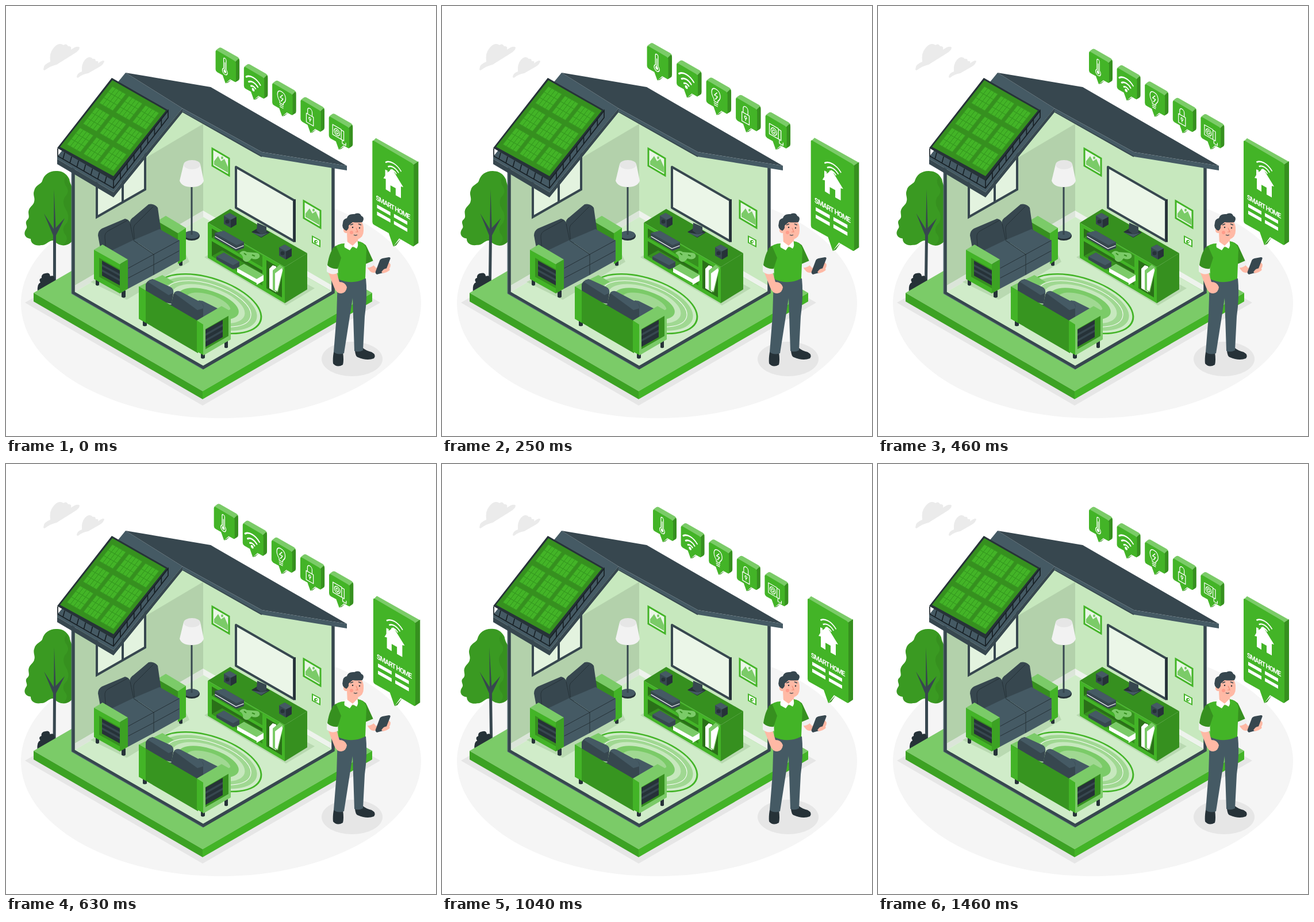
Write an HTML page that moves like this. It is 748 px wide and 748 px high and loops after 1.5 s.

```html
<!DOCTYPE html>
<html lang="en">
<head>
<meta charset="utf-8">
<title>Smart home</title>
<style>
html, body { margin: 0; height: 100%; overflow: hidden; background: #fff }
svg { display: block; width: 100vw; height: 100vh }
.g { fill: #43b427 } .d { fill: #36901f } .l { fill: #7bcb68 } .n { fill: #2a7018 }
.s { fill: #455a64 } .k { fill: #37474f } .b { fill: #263238 } .w { fill: #fff }
.skin { fill: #ffb9a5 } .glass { fill: #ebf6e8 } .soft { fill: #a0d892 }
.line { fill: none; stroke: #fff; stroke-linecap: round; stroke-linejoin: round }
.dark { fill: none; stroke: #37474f }
.seam { fill: none; stroke: #263238; stroke-linecap: round }
</style>
</head>
<body>
<svg viewBox="0 0 748 748">
<ellipse cx="374" cy="517" rx="348" ry="200" fill="#f5f5f5"/>
<g fill="#ebebeb">
  <path d="M65 111Q65 101 77 97Q75 82 82 74Q91 62 100 68Q105 64 108 70Q115 69 113 76Q124 68 128 72Q128 77 120 82L88 102Q78 104 67 112Z"/>
  <path d="M123 124Q123 117 132 114Q131 101 137 94Q145 85 151 92Q156 91 156 96Q162 95 160 100Q169 93 171 96Q170 101 164 105L143 117Q134 118 125 125Z"/>
</g>

<g id="tree">
  <path fill="#3a9a22" d="M89 287C76 286 66 293 63 304C62 310 51 311 49 321C46 329 51 333 49 340C48 347 40 349 39 358C39 365 42 368 36 373C32 379 39 383 35 388C29 397 34 404 43 405C43 414 52 418 61 416C70 417 74 407 83 408C91 417 104 420 113 411L126 400V325C116 318 112 312 110 301C105 291 97 287 89 287Z"/>
  <path class="d" d="M105 296C108 310 116 318 126 325V400L113 411Q107 416 99 416Q111 406 102 396Q96 386 106 377Q112 365 103 352Q96 338 105 329Q111 321 103 311Q99 302 105 296Z"/>
  <path class="k" d="M83.500 319L86.500 386L102 369L87 399V506H82V399L66 361L83 388Z"/>
  <path class="b" d="M55 497Q54 483 60 481Q56 475 62 473Q61 466 69 465Q76 463 77 470Q85 467 85 476Q90 478 86 485V498Z"/>
</g>

<path fill="#e6e6e6" d="M33 516L342 338L651 516L342 695Z"/>
<path class="l" d="M48 499L342 329L637 499L342 670Z"/>
<path fill="#3ca223" d="M48 499L342 670V684L48 514Z"/>
<path class="g" d="M637 499V514L342 684V670Z"/>

<!-- room -->
<path fill="#b3d1ab" d="M118 290L307 180L343 204V366L118 497Z"/>
<path fill="#c7e8be" d="M307 181L343 205L240 266Z"/>
<path fill="#c7e8be" d="M343 204L307 180L445 258L568 281V497L343 366Z"/>
<path fill="#d0ecc9" d="M118 497L343 366L568 497L343 628Z"/>
<path fill="#eef3ed" d="M120 486L343 356L567 486V496L343 367L120 497Z"/>
<path fill="#dbe5d9" d="M120 486L343 356V367L120 497Z"/>
<path class="dark" stroke-width="5.500" d="M117 280V499L343 629L569 498V278"/>
<path fill="none" stroke="#5a707b" d="M114 285V500L343 632"/>

<!-- window -->
<path fill="#e3f3df" d="M158 312L242 262V319L158 368Z"/>
<path class="dark" stroke-width="4" d="M158 300V367L242 319V255M203 280V342"/>

<!-- roof -->
<path class="s" d="M208 116L307 178L187 324L89 266V262Z"/>
<path class="k" d="M208 116L356 141L593 278L445 254L307 178Z"/>
<path class="s" d="M445 254L593 278V286L445 262L307 183V178Z"/>
<path class="k" d="M307 178V185L187 333L89 275V266L187 324Z"/>
<path class="dark" stroke-width="2" d="M307 184L445 262"/>
<path class="b" d="M184 125L282 181L187 304L89 247Z"/>
<path class="d" d="M185 129L278 182L187 296L94 245Z"/>
<g id="solar" class="g" stroke="#369a20" stroke-width="1"></g>
<path id="rail" fill="none" stroke="#182126" stroke-width="1.700" d="M90 248V261L187 317L282 194V182L187 304V317"/>

<!-- wall pictures and lamp -->
<g id="frame">
  <path class="glass" stroke="#43b427" stroke-width="3" d="M359 248L388 265V295L359 278Z"/>
  <path class="l" d="M362 276V270L369 261L374 270L380 266L386 280V290Z"/>
  <ellipse class="l" cx="376" cy="264" rx="2" ry="2.500"/>
</g>
<use href="#frame" x="159" y="91"/>
<path class="g" d="M532 399L547 407V420L532 412Z"/>
<path class="w" d="M534 402L545 408V417L534 411Z"/>
<circle class="g" cx="539" cy="410" r="3"/><circle class="w" cx="540" cy="410" r="1.300"/>
<ellipse class="b" cx="323" cy="400" rx="14" ry="8"/><ellipse class="s" cx="323" cy="398" rx="13" ry="7"/>
<path class="dark" stroke-width="3" d="M323 310V398"/>
<path fill="#f2f2f2" d="M309 275L302 304Q306 315 323 315Q340 315 344 304L338 275Z"/>
<ellipse cx="323.500" cy="276" rx="14.500" ry="8" fill="#e6e6e6"/>

<!-- cabinet -->
<path fill="#b9d9b1" d="M345 437L355 431L524 484L537 491L487 521Z"/>
<path class="glass" stroke="#37474f" stroke-width="4" stroke-linejoin="round" d="M400 280L501 338V409L400 351Z"/>
<path class="b" d="M500 337L504 336V411L500 409Z"/>
<path class="d" d="M351 377L390 353L524 430L485 454Z"/>
<path class="g" d="M351 377L485 454V517L351 438Z"/>
<path class="d" d="M485 454L524 430V493L485 517Z"/>
<path class="n" d="M358 387L446 438V454L358 403ZM358 409L446 460V486L358 435ZM453 442L480 458V507L453 491Z"/>
<path class="d" d="M358 403L376 393L446 434V454ZM358 435L376 425L446 465V486Z"/>
<path class="k" d="M363 395L379 391L414 411V421L401 426L363 404Z"/>
<path class="s" d="M363 395L379 391L414 411L401 416Z"/>
<path class="line" stroke-width="1.300" d="M364 401L400 422L413 417"/>
<path class="k" d="M366 436L379 429L406 445V454L395 458L366 441Z"/>
<path class="s" d="M366 436L379 429L406 445L395 451Z"/>
<path class="l" d="M406 430Q412 423 419 428L432 429Q443 429 441 437Q436 443 427 439Q419 450 412 441Q414 435 406 430Z"/>
<path fill="none" stroke="#36901f" stroke-width="2" d="M414 430l4 3m10 0l5 2"/>
<path class="w" d="M402 456L414 449L448 468V478L436 485L402 465Z"/>
<path class="l" d="M402 456L414 449L448 468L436 475Z"/>
<path class="g" d="M402 463L436 482V485L402 466Z"/>
<path class="w" d="M458 457L464 451L470 453V498L458 491Z"/>
<path class="l" d="M464 460L476 450L483 455L473 498L464 494Z"/>
<path class="w" d="M468 465L480 456L481 460L472 496L468 494Z"/>
<path class="b" d="M427 393L442 384L459 394L444 403Z"/>
<path class="k" d="M437 377L453 384V394L444 397L436 391Z"/>
<path class="s" d="M428 394L445 397L457 394L444 402Z"/>
<g id="speaker">
  <path class="k" d="M379 365L389 360L401 367V380L391 386L379 379Z"/>
  <path class="s" d="M379 365L389 360L401 367L391 372Z"/>
  <path class="b" d="M391 372L401 367V380L391 386Z"/><circle class="b" cx="385" cy="375" r="3.500"/>
</g>
<use href="#speaker" x="96" y="55"/>

<!-- rug -->
<g transform="translate(352 518) rotate(18)">
  <ellipse class="g" rx="97" ry="46"/><ellipse fill="#d0ecc9" rx="94" ry="43.500"/>
  <ellipse class="soft" rx="88" ry="40"/><ellipse class="line" rx="77" ry="34"/>
  <ellipse fill="#c7e8be" rx="66" ry="29"/><ellipse class="l" rx="55" ry="23"/>
  <ellipse class="soft" rx="40" ry="16"/>
</g>

<!-- far sofa -->
<path fill="#b9d9b1" d="M147 480L300 405L319 445L210 511Z"/>
<path class="b" d="M156 473h6v12q-3 3-6 0ZM201 495h7v11q-3 3-7 0ZM301 438h6v13q-3 2-6 0Z"/>
<path class="l" d="M263 374L278 365L313 386L299 395Z"/>
<path class="d" d="M263 374L299 395V425L263 404Z"/>
<path class="g" d="M299 395L313 386V440L299 449Z"/>
<path class="k" d="M215 379Q215 371 222 367L248 345Q258 343 264 351L270 393L224 415Z"/>
<path class="k" d="M160 399Q160 391 167 387L207 370Q214 371 217 379L224 413L176 432L164 421Z"/>
<path class="seam" d="M174 426L172 403Q171 394 180 390L211 373M224 410L222 390Q221 382 227 378L256 349M216 379L223 412"/>
<path class="s" d="M174 430L222 407L257 431V468L212 492V458Z"/>
<path class="s" d="M222 407L267 388L302 408V443L257 468V431Z"/>
<path class="seam" d="M213 456L257 432L301 408M257 432V467M213 473L257 450L301 426M222 408L257 432"/>
<path class="l" d="M153 424L168 415L212 441L198 449Z"/>
<path class="g" d="M153 424L198 449V500L153 475Z"/>
<path fill="#3ca223" d="M198 449L212 441V492L198 500Z"/>
<path class="d" d="M162 438L198 458V491L162 471Z"/>
<path class="b" d="M167 443L198 460V486L167 469Z"/>
<path class="k" d="M167 449L198 466V470L167 453ZM167 458L198 475V479L167 462Z"/>

<!-- near sofa -->
<path class="b" d="M238 543h7v13q-4 2-7 0ZM339 600h7v12q-4 3-7 0ZM380 582h6v12q-3 2-6 0Z"/>
<path class="l" d="M231 488L272 468L292 480L246 502Z"/>
<path class="k" d="M336 513L376 530L340 552L280 520Z"/>
<path class="s" d="M335 512L342 513L376 530L344 546Z"/>
<path class="k" d="M243 501V484Q246 477 255 475L286 489Q292 492 291 500L288 518L268 514Z"/>
<path class="s" d="M247 480Q252 474 258 476L286 489Q292 492 291 499L283 503Z"/>
<path class="k" d="M287 521L291 502Q296 493 303 497L338 515Q345 519 343 526V550L328 546Z"/>
<path class="s" d="M292 499Q297 494 304 497L338 515Q344 519 343 526L333 529Z"/>
<path fill="#379520" d="M231 488L334 548V604L231 544Z"/>
<path class="g" d="M231 488L243 495V551L231 544Z"/>
<path class="l" d="M332 547L375 522L391 531L343 558Z"/>
<path class="g" d="M332 547L343 554V607L332 601Z"/>
<path class="l" d="M343 555L391 527V580L343 608Z"/>
<path class="d" d="M347 562L387 539V574L347 597Z"/>
<path class="b" d="M347 563L377 546V576L347 593Z"/>
<path class="k" d="M347 570L377 553V557L347 574ZM347 580L377 563V567L347 584Z"/>

<g id="pulse"></g>

<!-- man -->
<ellipse cx="602" cy="614" rx="53" ry="30" fill="#e6e6e6"/>
<path class="b" d="M570 602Q568 614 569 622Q576 630 586 624Q588 616 586 602ZM607 600Q608 610 612 611Q628 618 640 613Q645 607 636 602Q627 600 621 595Z"/>
<path class="s" d="M577 472L626 474Q629 505 624 540L621 599Q613 603 606 600L603 508L588 604Q578 608 570 602L575 540Z"/>
<path class="skin" d="M626 446L637 448L644 456L655 446Q665 441 669 450Q669 459 659 461L640 464Q633 464 628 454Z"/>
<path class="k" d="M643 465Q642 463 644 459L650 443Q651 440 655 439L666 437Q670 437 668 441L661 459Q660 463 656 464L645 467Z"/>
<path class="skin" d="M653 463Q658 455 664 457Q669 456 667 460Q662 464 656 465Z"/>
<path class="d" d="M609 409Q624 410 628 420L639 444Q632 451 624 451Z"/>
<path fill="#f0f0f0" d="M625 449L639 443L642 449Q635 456 628 455Z"/>
<path class="g" d="M589 413L611 409Q626 412 627 424L625 474Q602 486 578 475L577 443L568 422Q577 413 589 413Z"/>
<path class="skin" d="M560 462L574 460L580 480Q590 480 593 489Q592 499 583 500Q575 500 571 490Z"/>
<path fill="#f0f0f0" d="M558 450L577 453L576 465Q566 469 558 462Z"/>
<path class="d" d="M574 417Q563 424 559 451Q566 458 577 457L583 438Z"/>
<path class="skin" d="M593 395L613 401L611 417Q601 423 594 414Z"/>
<path class="w" d="M592 409Q587 414 589 420L598 425L603 418L610 422Q614 416 611 409L603 417Z"/>
<path class="skin" d="M594 379Q599 371 615 373Q623 377 622 391Q622 403 611 406Q599 407 594 395Q586 396 587 388Q590 383 594 388Z"/>
<path class="k" d="M592 391Q583 387 586 377Q586 371 593 369Q595 361 606 362Q615 358 618 365Q625 368 620 376Q611 377 603 376L596 382Q597 388 592 391Z"/>
<path class="b" d="M602 384a1.200 1.600 0 1 0 2 0ZM614 385a1.200 1.600 0 1 0 2 0Z"/>
<path class="dark" stroke-width="1.400" d="M599 381l5-2m9 0l5 2M605 398q3 2 6 0"/>
<path fill="none" stroke="#ed8b75" stroke-width="1.200" d="M609 386l3 7l-4 0"/>
<circle cx="601" cy="394" r="3" fill="#ff9c8b"/>
</svg>

<script>
const byId = id => document.getElementById(id);
const icons = [
  '<path d="M-2.500 4V-12a2.500 2.500 0 0 1 5 0V4a5 5 0 1 1-5 0ZM0-7V6"/><circle cy="8" r="2" fill="#fff"/>',
  '<path stroke-width="2.600" d="M-14-4a20 20 0 0 1 28 0M-9 2a13 13 0 0 1 18 0M-4.500 7a7 7 0 0 1 9 0"/><circle cy="11" r="2" fill="#fff"/>',
  '<path d="M-3.500 7V4C-11-3-9-14 0-14S11-3 3.500 4V7ZM-3.500 10H3.500M-3 13H3M2-9L-3-3H3L-1 3"/>',
  '<path d="M-7-2H7V13H-7ZM-4.500-2V-9a4.500 4.500 0 0 1 9 0V-2M0 6V9"/><circle cy="4" r="2"/>',
  '<path d="M-11-9H6V8H-11ZM6-8H11V8H6M8 8V14H15V10"/><circle cx="-2.500" r="5.500"/><circle cx="-2.500" r="2.500"/>'
];

const bubble = (icon, i) => `<g transform="translate(${367 + 48.6 * i} ${74 + 28.4 * i})">
  <path class="l" d="M0 8Q0 5 2 4L6 1Q8 0 10 1L38 17Q41 19 41 22L34 27Z"/>
  <path class="d" d="M34 25L39 20Q41 20 41 24V53Q41 56 39 57L34 60ZM17 62L21 61L28 55Z"/>
  <path class="g" d="M0 8Q0 5 3 6L32 23Q35 25 35 28V58Q35 61 32 59L25 55L17 62L12 48L3 43Q0 41 0 38Z"/>
  <g class="line" stroke-width="1.400" transform="matrix(.866 .5 0 1 16 33.500)">${icon}</g></g>`;

const bar = (x, y) => `<path d="M${x} ${y}l23 13v6l-23-13Z"/>`;

byId('pulse').innerHTML = icons.map(bubble).join('') + `
  <path class="l" d="M636 236L642 230L715 271L706 279Z"/>
  <path class="d" d="M706 276L715 270V410L706 416ZM672 416L677 414L685 402Z"/>
  <path class="g" d="M636 236Q636 233 639 235L704 273Q707 275 707 278V414Q707 417 704 415L682 402L672 416L664 393L639 379Q636 377 636 374Z"/>
  <g class="line" stroke-width="2.200" transform="matrix(.866 .5 0 1 672 288)">
    <path d="M-15-9a22 22 0 0 1 30 0M-10-4a15 15 0 0 1 20 0M-5.500 0a8 8 0 0 1 11 0"/></g>
  <g class="w">
    <path d="M655 299L658 294V284L662 286V289L670 283L689 314L685 313V333L676 328V316L667 311V323L659 318V300Z"/>
    ${bar(644, 344)}${bar(644, 356)}${bar(673, 360)}${bar(673, 372)}
    <text transform="matrix(.866 .5 0 1 642 336)" font-family="Roboto, sans-serif" font-weight="700" font-size="12" letter-spacing="-1">SMART HOME</text>
  </g>`;

// Points on the solar panel: u runs along the ridge, v down the slope.
const onPanel = (u, v) => `${185 + 93 * u - 91 * v} ${129 + 53 * u + 116 * v}`;
const quad = (u, v, w, h) =>
  `M${onPanel(u, v)}L${onPanel(u + w, v)}L${onPanel(u + w, v + h)}L${onPanel(u, v + h)}Z`;
let cells = '';
for (let i = 0; i < 12; i++)
  for (let j = 0; j < 9; j++)
    cells += quad(.065 + (i >> 2) * .31 + i % 4 * .0625, .065 + (j / 3 | 0) * .31 + j % 3 * .083, .0625, .083);
byId('solar').innerHTML = `<path d="${cells}"/>`;

let posts = '';
for (let i = 1; i < 8; i++)
  posts += `M${90 + 12.1 * i} ${248 + 7 * i}l-3 11M${187 + 11.9 * i} ${304 - 15.2 * i}v12`;
byId('rail').setAttribute('d', byId('rail').getAttribute('d') + posts);

// Linear interpolation through [time, value] pairs.
function follow(keys, t) {
  const i = keys.findIndex(key => t < key[0]);
  const [t0, a] = keys[i - 1], [t1, b] = keys[i];
  return a + (b - a) * (t - t0) / (t1 - t0);
}
const beat = [[0, 1], [150, 1.1], [450, 1], [600, 1], [750, 1.1], [900, 1], [1500, 1]];
const sway = [[0, 0], [375, 1], [1125, -1], [1500, 0]];
const step = 1500 / 36;

function draw(now) {
  const t = (Math.floor((now % 1500 + 5) / step) % 36 + .5) * step;
  byId('pulse').setAttribute('transform',
    `translate(541 244.500) scale(${follow(beat, t)}) translate(-541 -244.500)`);
  byId('tree').setAttribute('transform', `rotate(${follow(sway, t)} 79 398)`);
}
const start = performance.now();
function loop() {
  draw(performance.now() - start);
  requestAnimationFrame(loop);
}
loop();
</script>
</body>
</html>
```
